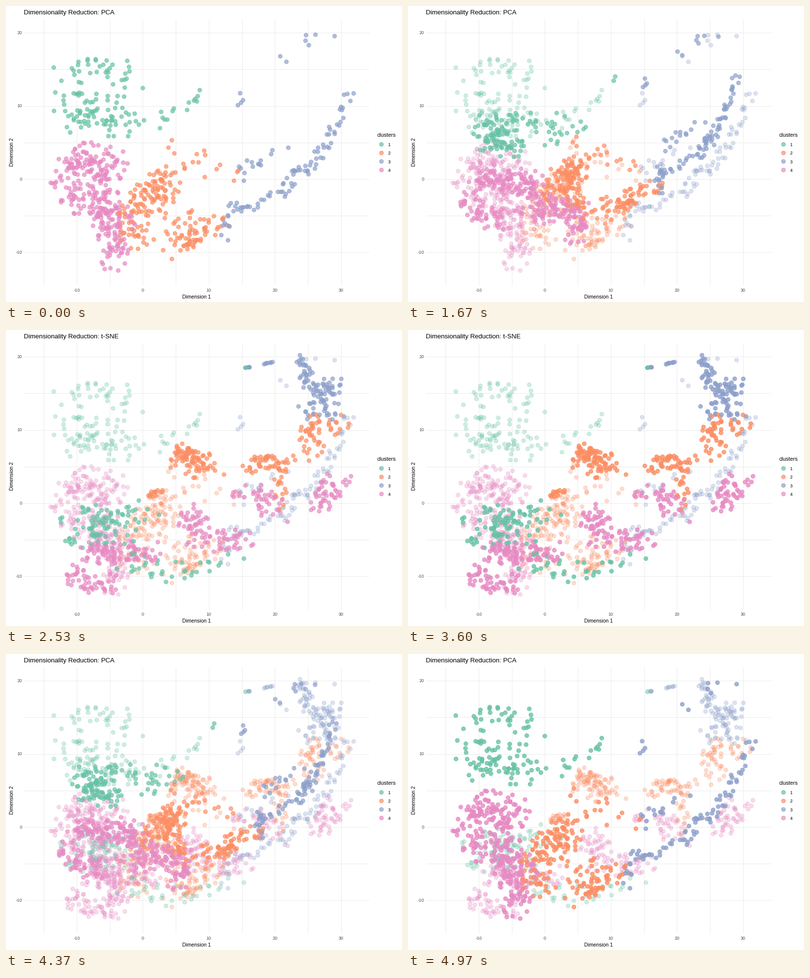
Write a matplotlib script that moves like this. It is 800 px wide and 600 px high and loops after 5 s.

```python
import matplotlib.pyplot as plt
import numpy as np
from matplotlib.animation import FuncAnimation
from matplotlib.colors import to_rgba

W, H, DPI = 800, 600, 100
FRAMES, LOOP_MS = 150, 5000
LEAVE, ARRIVE, RETURN, HOME = 32, 75, 107, 149
PX = 72 / DPI
COLORS = ["#66C2A5", "#FC8D62", "#8DA0CB", "#E78AC3"]
GREEN, ORANGE, BLUE, PINK = range(4)
FULL, FAINT = 0.7, 0.3

plt.rcParams["font.family"] = "Liberation Sans"
rng = np.random.default_rng(11)
flows = []


def band(n, spread, *path):
    """Scatter n points around a path, the same number on each leg."""
    path = np.array(path, float)
    t = (np.arange(n) + rng.random(n)) / n * (len(path) - 1)
    legs = np.arange(len(path))
    x, y = np.interp(t, legs, path[:, 0]), np.interp(t, legs, path[:, 1])
    r, a = spread * rng.random(n) ** 0.55, rng.uniform(0, 2 * np.pi, n)
    return np.column_stack([x + r * np.cos(a), y + r * np.sin(a)])


def flow(kind, n, start, end):
    """Send a band of the PCA view to a band of the t-SNE view."""
    flows.append((np.full(n, kind), band(n, *start), band(n, *end)))


flow(GREEN, 82, (47, (120, 215), (245, 225)), (46, (245, 390), (130, 400)))
flow(GREEN, 36, (32, (115, 135), (185, 125), (270, 140)), (24, (235, 465), (320, 490), (460, 475)))
flow(GREEN, 12, (20, (300, 245), (385, 170)), (40, (220, 380), (290, 375)))
flow(GREEN, 2, (2, (385, 187), (394, 166)), (0, (483, 76), (484, 76)))

flow(ORANGE, 68, (38, (285, 390), (325, 355)), (31, (345, 258), (395, 272)))
flow(ORANGE, 14, (30, (300, 410), (270, 380)), (8, (285, 333), (315, 325)))
flow(ORANGE, 46, (36, (250, 400), (265, 475)), (20, (490, 275), (570, 265)))
flow(ORANGE, 52, (24, (345, 485), (425, 440)), (27, (618, 245), (612, 200), (680, 185)))
flow(ORANGE, 20, (36, (330, 490), (350, 410)), (16, (550, 275), (555, 350)))
flow(ORANGE, 18, (36, (315, 295), (465, 335)), (14, (340, 242), (435, 285)))

flow(BLUE, 88, (12, (442, 468), (450, 408), (495, 404), (560, 378), (580, 342),
                (614, 326), (642, 285), (664, 238), (695, 170)),
     (20, (675, 163), (605, 165), (665, 112), (620, 125), (605, 88), (588, 68)))
flow(BLUE, 14, (25, (455, 345), (560, 300)), (32, (620, 140), (670, 110)))
flow(BLUE, 7, (30, (550, 95), (650, 68)), (1, (521, 68), (538, 65)))
flow(BLUE, 4, (2, (466, 202), (479, 191), (471, 165)), (0, (489, 75), (492, 75)))

flow(PINK, 52, (38, (115, 360), (175, 405)), (24, (130, 478), (155, 520), (230, 518)))
flow(PINK, 88, (40, (130, 300), (215, 325)), (23, (165, 452), (220, 455), (300, 446)))
flow(PINK, 45, (42, (155, 350), (220, 365)), (28, (360, 372), (385, 380), (380, 435)))
flow(PINK, 40, (34, (170, 400), (230, 425)), (25, (400, 430), (485, 425)))
flow(PINK, 42, (32, (190, 430), (235, 440)), (30, (475, 328), (525, 340), (550, 375)))
flow(PINK, 50, (33, (215, 450), (220, 515)), (30, (668, 300), (650, 335), (628, 340)))

kinds, pca, tsne = (np.concatenate(part) for part in zip(*flows))
order = rng.permutation(len(kinds))
kinds, pca, tsne = kinds[order], pca[order], tsne[order]

fig = plt.figure(figsize=(W / DPI, H / DPI), dpi=DPI, facecolor="white")
ax = fig.add_axes([0, 0, 1, 1])
ax.set(xlim=(0, W), ylim=(H, 0))
ax.axis("off")


def dots(xy, ids, alpha, z):
    rgba = [to_rgba(COLORS[i], alpha) for i in ids]
    return ax.scatter(xy[:, 0] + 0.5, xy[:, 1] + 0.5, s=(8.2 * PX) ** 2, facecolors=rgba,
                      edgecolors=rgba, linewidths=PX, zorder=z)


def text(x, y, s, size, color="black", **kw):
    return ax.text(x, y, s, fontsize=size * PX, color=color, **{"va": "baseline", **kw})


# Grid, axes and legend
grid = dict(colors="#EBEBEB", linewidths=PX, antialiased=False, zorder=0)
ax.vlines(np.floor(75.7 + 66.75 * np.arange(10)) + 0.5, 37 - 10, 566, **grid)
ax.hlines(np.round(53.2 + 74.2 * np.arange(7)) + 0.5, 37, 733, **grid)
for k in range(5):
    text(142.7 + 133.5 * k, 579, str(10 * k - 10), 9, "#4D4D4D", ha="center")
for k in range(4):
    text(32.5, 57 + 148.4 * k, str(20 - 10 * k), 9, "#4D4D4D", ha="right")
text(385, 593, "Dimension 1", 10.4, ha="center")
text(12, 296, "Dimension 2", 10.4, ha="center", va="center", rotation=90)
text(750, 265, "clusters", 11)
keys = np.array([(758, 280 + 17.3 * k) for k in range(4)])
dots(keys, range(4), FULL, 3)
for k, (_, y) in enumerate(keys):
    text(771.5, y + 4, str(k + 1), 9)
title = text(36.5, 17, "", 13.1)

pca_mark = dots(pca, kinds, FAINT, 1)
tsne_mark = dots(tsne, kinds, FAINT, 2)
live = dots(pca, kinds, FULL, 3)


def ease(p):
    """Cubic in and out."""
    p = min(max(p, 0), 1)
    return 4 * p ** 3 if p < 0.5 else 1 - 4 * (1 - p) ** 3


def draw(i):
    go = (i - LEAVE) / (ARRIVE - LEAVE)
    back = (i - RETURN) / (HOME - RETURN)
    live.set_offsets(pca + (tsne - pca) * (ease(go) - ease(back)) + 0.5)
    pca_mark.set_visible(i > LEAVE)
    tsne_mark.set_visible(i > RETURN)
    method = "t-SNE" if go >= 0.5 and back < 0.5 else "PCA"
    title.set_text("Dimensionality Reduction: " + method)
    return pca_mark, tsne_mark, live, title


anim = FuncAnimation(fig, draw, frames=FRAMES, interval=LOOP_MS / FRAMES,
                     repeat=True, repeat_delay=0, blit=False)
plt.show()
```
